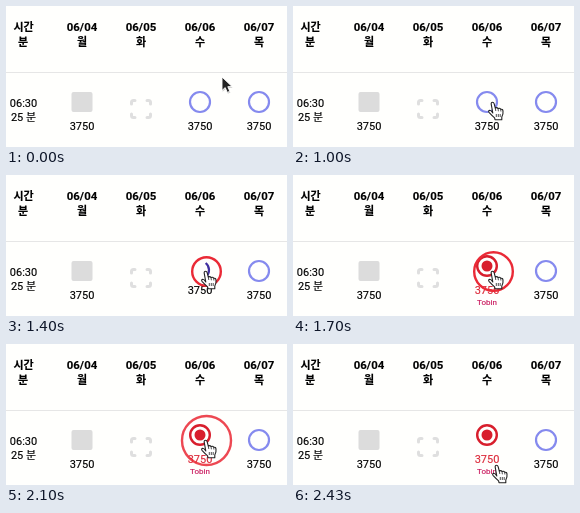
An HTML page for the animation above (2.46 s loop, 281 by 141 pixels).

```html
<!DOCTYPE html>
<html lang="ko">
<head>
<meta charset="utf-8">
<title>Booking cell</title>
<style>
html, body { margin: 0; width: 100%; height: 100%; overflow: hidden; background: #fffffd; }
svg { display: block; width: 100%; height: 100%; }
text { font: 11px Roboto, "Noto Sans CJK KR", "Noto Sans CJK", sans-serif; text-anchor: middle; fill: #000; stroke: #000; stroke-width: .15; }
.head { font-weight: 700; font-size: 11.4px; }
.ko { font-size: 11px; }
.free { fill: none; stroke: #858aee; stroke-width: 2.2; }
.gone { fill: none; stroke: #dfdfdf; stroke-width: 3; stroke-linecap: round; }
.booked { fill: #dc2a3a; stroke: #dc2a3a; }
.guest { font-size: 8px; fill: #c8145a; stroke: #c8145a; }
</style>
</head>
<body>
<svg viewBox="0 0 281 141">
  <g id="grid"></g>
  <path d="M0 66.500H281" stroke="#e6e6e6"/>
  <rect x="65.500" y="86" width="21" height="20" rx="2" fill="#dcdcdc"/>
  <path class="gone" d="M125.500 98V96.500Q125.500 94.500 127.500 94.500H129M141 94.500H142.500Q144.500 94.500 144.500 96.500V98M144.500 108V109.500Q144.500 111.500 142.500 111.500H141M129 111.500H127.500Q125.500 111.500 125.500 109.500V108"/>
  <circle class="free" cx="253" cy="96" r="10"/>
  <circle class="free" id="free" cx="194" cy="96" r="10"/>
  <path id="spin" fill="none" stroke="#4030a0" stroke-width="2.200"/>
  <g id="done">
    <circle cx="194" cy="91" r="9.800" fill="#fffffd" stroke="#d81e2c" stroke-width="2.400"/>
    <circle cx="194" cy="91" r="5.500" fill="#d81e2c"/>
    <text class="guest" x="194" y="130">Tobin</text>
  </g>
  <text id="price" x="194">3750</text>
  <circle id="ripple" cx="200.500" cy="96.500" fill="none" stroke="#ea2a36" stroke-width="2.400"/>
  <g id="arrow">
    <path d="M0 0V13.500L3.200 10.600 5.300 15.400 7.800 14.300 5.800 9.700 10 9.500Z" transform="translate(.6 1.300)" opacity=".2"/>
    <path d="M0 0V13.500L3.200 10.600 5.300 15.400 7.800 14.300 5.800 9.700 10 9.500Z" fill="#222" stroke="#fff" stroke-width=".9"/>
  </g>
  <g id="hand" stroke-linejoin="round">
    <path d="M4.800 11.500L3.200 2.600Q3 .8 4.500 .8Q5.800 .8 6.200 2.400L7.300 6.600Q9 5.600 10 7Q12 6.200 12.700 7.800Q14.800 7.400 15 9.600Q15.400 13 13.800 15.500V18.200H7L6.600 16.400Q4 14 1 10.800Q0 9.200 1.600 8.800Q3 8.700 4.800 11.500Z" fill="#fff" stroke="#222" stroke-width="1.100"/>
    <path d="M7.300 6.600L7.800 9.500M10 7L10.400 9.800M12.700 7.800L12.900 10M8.300 12.500V15.500M10.300 12.500V15.500M12.200 12.500V15.500" fill="none" stroke="#222" stroke-width=".8"/>
  </g>
</svg>
<script>
const LOOP = 2460;
const $ = id => document.getElementById(id);
const label = (x, y, s, cls = "") => `<text class="${cls}" x="${x}" y="${y}">${s}</text>`;
const xs = [76, 135, 194, 253];

$("grid").innerHTML =
  label(17.5, 24.7, "시간", "head ko") + label(17, 40.2, "분", "head ko") +
  xs.map((x, i) => label(x, 24.5, "06/0" + (i + 4), "head") + label(x, 40.2, "월화수목"[i], "head ko")).join("") +
  label(17.5, 101, "06:30") + label(17.5, 115, "25 분") +
  label(76, 124, "3750") + label(253, 124, "3750");

const clamp = v => Math.min(1, Math.max(0, v));
const span = (t, a, b) => clamp((t - a) / (b - a));
const smooth = u => u * u * (3 - 2 * u);
const show = (id, on) => $(id).setAttribute("visibility", on ? "visible" : "hidden");
const move = (id, x, y) => $(id).setAttribute("transform", `translate(${x} ${y})`);

// Pointer legs: start, end, dx, dy
const legs = [[5, 130, -10, 25], [380, 460, -6.5, 0.5], [2110, 2420, 4, 25]];

function pointer(t) {
  let x = 216, y = 71;
  for (const [a, b, dx, dy] of legs) {
    const u = smooth(span(t, a, b));
    x += dx * u;
    y += dy * u;
  }
  return [x, y];
}

function arc(cx, cy, r, from, sweep) {
  const at = a => `${cx + r * Math.cos(a)} ${cy + r * Math.sin(a)}`;
  return `M${at(from)}A${r} ${r} 0 0 1 ${at(from + sweep)}`;
}

function draw(t) {
  const free = t < 1300, done = t >= 1450;
  show("free", free);
  show("spin", !free && !done);
  show("done", done);
  $("spin").setAttribute("d", arc(194, 95, 9, -0.9 + (t - 1400) / 120, 1.7));
  $("price").setAttribute("y", free ? 124 : 119.2);
  $("price").setAttribute("class", done ? "booked" : "");

  const outer = 15.5 * Math.sqrt(Math.max(0, t - 1000) / 400);
  $("ripple").setAttribute("r", Math.max(0, outer - 1.2));
  $("ripple").setAttribute("opacity", 1 - span(t, 2000, 2270) ** 2);
  show("ripple", t > 1000 && t < 2270);

  const [x, y] = pointer(t), link = y > 90;
  show("arrow", !link);
  show("hand", link);
  move("arrow", x, y);
  move("hand", x - 4.5, y - 1);
}

const start = performance.now();
function tick() {
  draw((performance.now() - start) % LOOP);
  requestAnimationFrame(tick);
}
draw(0);
requestAnimationFrame(tick);
</script>
</body>
</html>
```
